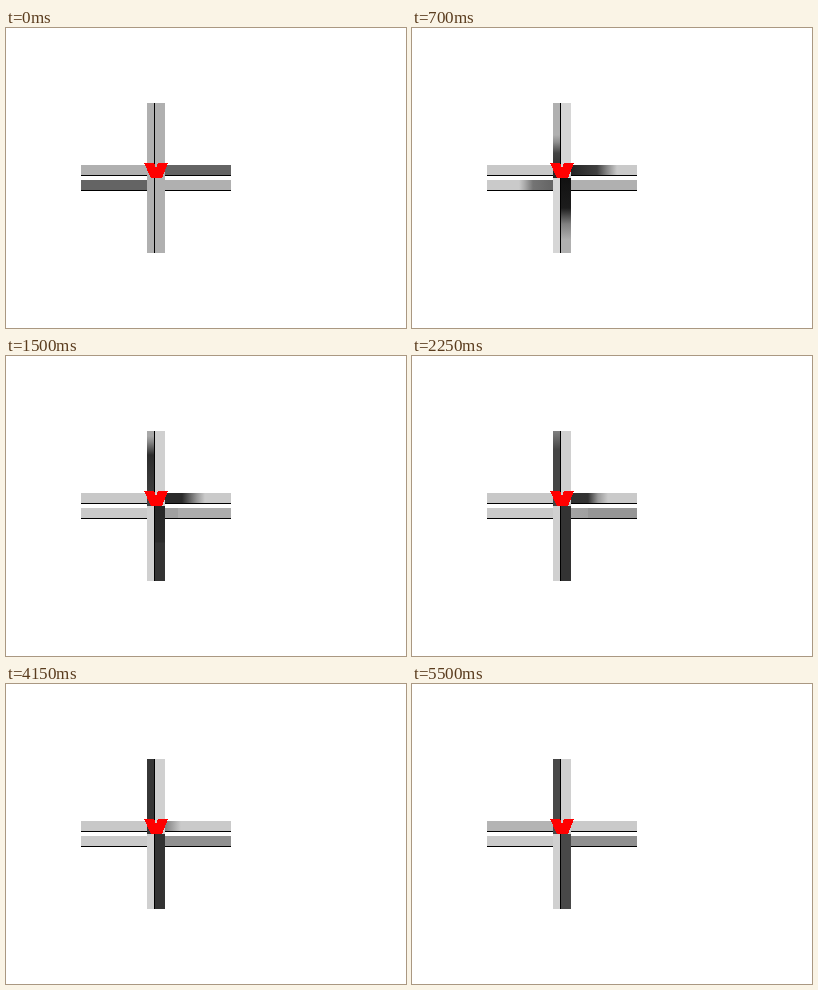
These frames come from a looping animation (400x300 px, 8.55 s). An HTML page without scripts:

```html
<!DOCTYPE html>
<html lang="en">
<head>
<meta charset="utf-8">
<title>Crossroads traffic density</title>
<style>
/* Each lane is a density profile: four shades, measured outward from the junction. */
@property --a { syntax: "<color>"; inherits: false; initial-value: #b0b0b0; }
@property --b { syntax: "<color>"; inherits: false; initial-value: #b0b0b0; }
@property --c { syntax: "<color>"; inherits: false; initial-value: #b0b0b0; }
@property --d { syntax: "<color>"; inherits: false; initial-value: #b0b0b0; }
@property --p { syntax: "<length>"; inherits: false; initial-value: 0px; }
@property --q { syntax: "<length>"; inherits: false; initial-value: 0px; }
@property --r { syntax: "<length>"; inherits: false; initial-value: 0px; }

html, body { margin: 0; width: 100%; height: 100%; overflow: hidden; background: #fff; }
.stage { position: relative; width: 400px; height: 300px; overflow: hidden; }
.lane {
  position: absolute;
  background: linear-gradient(var(--dir), var(--a) 0, var(--b) var(--p), var(--c) var(--q), var(--d) var(--r));
  animation: 8550ms linear infinite;
}
.west, .east { width: 66px; height: 10px; border-bottom: 1px solid #000; }
.west { left: 75px; --dir: to left; }
.east { left: 159px; --dir: to right; }
.upper { top: 137px; }
.lower { top: 152px; }
.north, .south { height: 75px; }
.north { top: 75px; --dir: to top; }
.south { top: 150px; --dir: to bottom; }
.left { left: 141px; width: 7px; border-right: 1px solid #000; }
.right { left: 149px; width: 10px; }
svg { position: absolute; inset: 0; }

.east.upper { animation-name: east-in; }
.west.lower { animation-name: west-in; }
.north.left { animation-name: north-in; }
.south.right { animation-name: south-in; }
.east.lower { animation-name: east-out; }
.west.upper { animation-name: west-out; }
.north.right, .south.left { animation-name: side-out; }

@keyframes east-in {
  0% { --a: #646464; --b: #646464; --c: #646464; --d: #cacaca; --p: 66px; --q: 66px; --r: 66px; }
  8.19% { --a: #242424; --b: #404040; --c: #888; --d: #cacaca; --p: 26px; --q: 36px; --r: 46px; }
  17.54% { --a: #2a2a2a; --b: #2a2a2a; --c: #999; --d: #cacaca; --p: 17px; --q: 32px; --r: 40px; }
  26.32% { --a: #303030; --b: #333; --c: #999; --d: #cacaca; --p: 17px; --q: 27px; --r: 37px; }
  39.18% { --a: #333; --b: #505050; --c: #a0a0a0; --d: #cacaca; --p: 10px; --q: 20px; --r: 27px; }
  48.54% { --a: #808080; --b: #a0a0a0; --c: #b8b8b8; --d: #cacaca; --p: 7px; --q: 12px; --r: 16px; }
  57.9%, 100% { --a: #cacaca; --b: #cacaca; --c: #cacaca; --d: #cacaca; --p: 0px; --q: 0px; --r: 0px; }
}
@keyframes west-in {
  0% { --a: #646464; --b: #646464; --c: #646464; --d: #cacaca; --p: 66px; --q: 66px; --r: 66px; }
  8.19% { --a: #646464; --b: #747474; --c: #a8a8a8; --d: #cacaca; --p: 20px; --q: 28px; --r: 34px; }
  16.7%, 100% { --a: #cacaca; --b: #cacaca; --c: #cacaca; --d: #cacaca; --p: 0px; --q: 0px; --r: 0px; }
}
@keyframes north-in {
  0% { --a: #b0b0b0; --b: #b0b0b0; --c: #b0b0b0; --d: #b0b0b0; --p: 0px; --q: 0px; --r: 0px; }
  8.19% { --a: #222; --b: #444; --c: #909090; --d: #b0b0b0; --p: 25px; --q: 36px; --r: 43px; }
  17.54% { --a: #444; --b: #2c2c2c; --c: #888; --d: #a8a8a8; --p: 51px; --q: 64px; --r: 70px; }
  26.32% { --a: #444; --b: #444; --c: #606060; --d: #808080; --p: 56px; --q: 65px; --r: 75px; }
  31.58%, 42.69% { --a: #484848; --b: #484848; --c: #484848; --d: #484848; --p: 56px; --q: 65px; --r: 75px; }
  48.54% { --a: #363636; --b: #363636; --c: #363636; --d: #363636; }
  52.63%, 100% { --a: #484848; --b: #484848; --c: #484848; --d: #484848; --p: 56px; --q: 65px; --r: 75px; }
}
@keyframes south-in {
  0% { --a: #b0b0b0; --b: #b0b0b0; --c: #b0b0b0; --d: #b0b0b0; --p: 0px; --q: 0px; --r: 0px; }
  8.19% { --a: #111; --b: #1c1c1c; --c: #808080; --d: #b0b0b0; --p: 30px; --q: 46px; --r: 62px; }
  17.54% { --a: #262626; --b: #2b2b2b; --c: #333; --d: #333; --p: 36px; --q: 37px; --r: 75px; }
  26.32%, 48.54% { --a: #333; --b: #333; --c: #333; --d: #333; --p: 36px; --q: 37px; --r: 75px; }
  52.63%, 100% { --a: #484848; --b: #484848; --c: #484848; --d: #484848; --p: 36px; --q: 37px; --r: 75px; }
}
@keyframes east-out {
  0%, 8.19% { --a: #b0b0b0; --b: #b0b0b0; --c: #b0b0b0; --d: #b0b0b0; --p: 13px; --q: 13px; --r: 13px; }
  17.54% { --a: #a0a0a0; --b: #a0a0a0; --c: #acacac; --d: #acacac; --p: 13px; --q: 13px; --r: 13px; }
  26.32% { --a: #a4a4a4; --b: #a0a0a0; --c: #969696; --d: #969696; --p: 17px; --q: 17px; --r: 17px; }
  31.58%, 100% { --a: #909090; --b: #909090; --c: #909090; --d: #909090; --p: 17px; --q: 17px; --r: 17px; }
}
@keyframes west-out {
  0% { --a: #c8c8c8; --b: #c8c8c8; --c: #b0b0b0; --d: #b0b0b0; --p: 0px; --q: 0px; --r: 0px; }
  7%, 62.6% { --a: #c8c8c8; --b: #c8c8c8; --c: #c8c8c8; --d: #c8c8c8; --p: 66px; --q: 66px; --r: 66px; }
  64.33%, 100% { --a: #b4b4b4; --b: #b4b4b4; --c: #b4b4b4; --d: #b4b4b4; --p: 66px; --q: 66px; --r: 66px; }
}
@keyframes side-out {
  0% { --a: #d8d8d8; --b: #d8d8d8; --c: #b0b0b0; --d: #b0b0b0; --p: 0px; --q: 0px; --r: 0px; }
  7%, 8.19% { --a: #d6d6d6; --b: #d6d6d6; --c: #d6d6d6; --d: #d6d6d6; --p: 75px; --q: 75px; --r: 75px; }
  17.54%, 100% { --a: #d0d0d0; --b: #d0d0d0; --c: #d0d0d0; --d: #d0d0d0; --p: 75px; --q: 75px; --r: 75px; }
}
</style>
</head>
<body>
<div class="stage">
  <div class="lane west upper"></div>
  <div class="lane west lower"></div>
  <div class="lane east upper"></div>
  <div class="lane east lower"></div>
  <div class="lane north left"></div>
  <div class="lane north right"></div>
  <div class="lane south left"></div>
  <div class="lane south right"></div>
  <svg width="400" height="300" shape-rendering="crispEdges">
    <path fill="#f00" d="M138 135H148L150 140L152 135H162L156 150H145Z"/>
  </svg>
</div>
</body>
</html>
```
